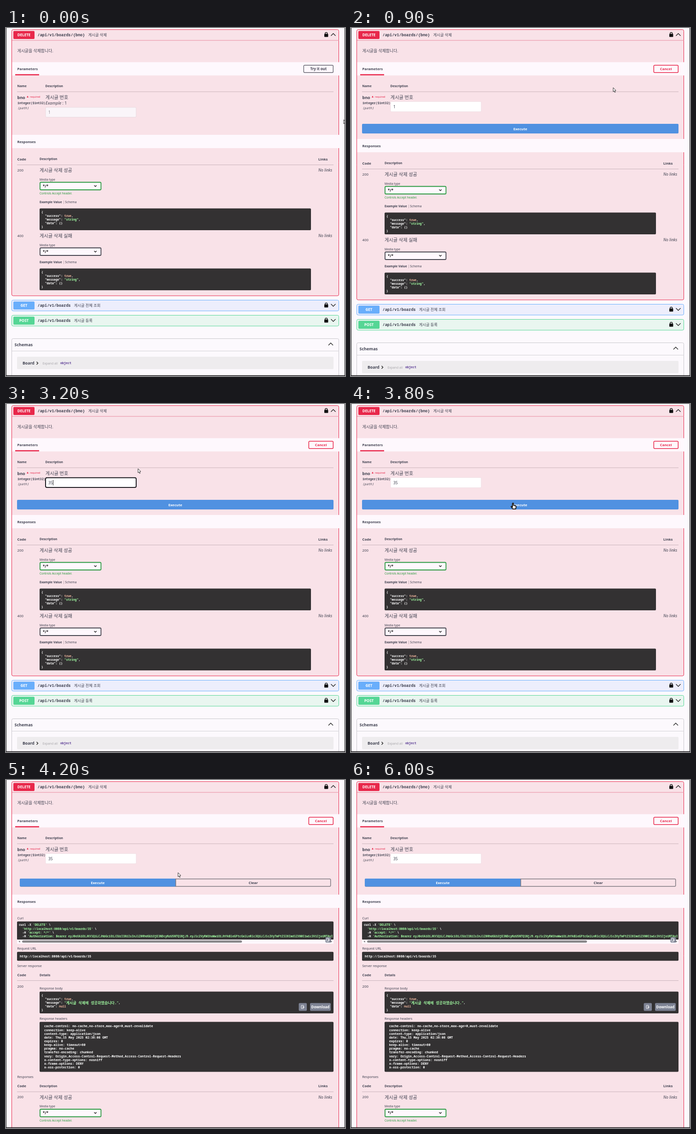
Recreate the animation shown at these times as an HTML page with a canvas. Size 737 px wide and 759 px high, loop 6100 ms.

```html
<!DOCTYPE html>
<html lang="ko">
<head>
<meta charset="utf-8">
<title>API docs</title>
<style>
  html, body { margin: 0; width: 100%; height: 100%; overflow: hidden; background: #fcf9fd; }
  canvas { display: block; }
</style>
</head>
<body>
<canvas id="stage" width="737" height="759"></canvas>
<script>
const ctx = document.getElementById('stage').getContext('2d');
const LOOP = 6100, STEP = 100;
const SANS = '"Noto Sans", "Noto Sans CJK KR", "Noto Sans CJK", sans-serif';
const MONO = '"Noto Sans Mono", "Noto Sans CJK KR", monospace';
const INK = '#3f4150', RED = '#e8274a', PINK = '#f9e2e8', PAGE = '#fcf9fd', STRIP = '#fef8fd';
const DARK = '#333132', WHITE = '#fff', GREEN = '#a2fca2', PEACH = '#f3b9a0', BLUE = '#5091e1';

// Moments of the interaction, in ms
const TRY = 800, FOCUS = 1500, ERASE = 2000, DIGIT_1 = 2100, DIGIT_2 = 2600, SEND = 3800, ANSWER = 3900;
const POINTER = [
  [0, 734, 200], [100, 734, 200], [600, 684, 90], [800, 674, 92], [900, 570, 130],
  [1300, 262, 168], [1500, 262, 169], [1800, 286, 141], [3200, 287, 141],
  [3700, 351, 216], [3900, 351, 216], [4200, 374, 202], [4900, 420, 330], [5500, 470, 770], [LOOP, 470, 770]
];

const clamp = v => Math.max(0, Math.min(1, v));

function text(s, x, y, size, { color = INK, style = '', align = 'left', family = SANS } = {}) {
  ctx.font = `${style} ${size}px ${family}`;
  ctx.fillStyle = color;
  ctx.textAlign = align;
  ctx.fillText(s, x, y + size * 0.36);
}
const bold = (s, x, y, size, more) => text(s, x, y, size, { style: 'bold', ...more });
const label = (s, x, y) => text(s, x, y, 7, { style: '500' });
const centered = (s, x, y, size, color) => bold(s, x, y, size, { color, align: 'center' });

// Monospace line made of [string, color, size] parts
function code(x, y, size, ...parts) {
  for (const [s, color = WHITE, own = size] of parts) {
    text(s, x, y, own, { color, style: 'bold', family: MONO });
    x += ctx.measureText(s).width;
  }
}

function box(x, y, w, h, fill, stroke, line = 1, radius = 2) {
  ctx.beginPath();
  ctx.roundRect(x, y, w, h, radius);
  if (fill) { ctx.fillStyle = fill; ctx.fill(); }
  if (stroke) { ctx.strokeStyle = stroke; ctx.lineWidth = line; ctx.stroke(); }
}
function rect(x, y, w, h, fill) {
  ctx.fillStyle = fill;
  ctx.fillRect(x, y, w, h);
}
function path(points, stroke, line = 1, fill) {
  ctx.beginPath();
  points.forEach(([x, y]) => ctx.lineTo(x, y));
  if (fill) { ctx.closePath(); ctx.fillStyle = fill; ctx.fill(); }
  if (stroke) { ctx.strokeStyle = stroke; ctx.lineWidth = line; ctx.stroke(); }
}
const rule = y => rect(24, y, 688, 1, '#c9b3bb');
const chevron = (x, y, w, h, line = 1.3) => path([[x - w, y - h], [x, y + h], [x + w, y - h]], '#222', line);

function operation(y, h, name, route, summary, color, fill, open) {
  box(12.5, y + 0.5, 711, h, fill, color, 1, 3);
  box(16, y + 3.5, 46, 17.5, color);
  centered(name, 39, y + 12.3, 8, WHITE);
  text(route, 68.5, y + 12.3, 8.6, { style: '600', family: MONO });
  text(summary, route.length * 5.16 + 75.5, y + 12.5, 8.3);
  box(692, y + 9.8, 8.4, 6.8, '#111', null, 0, 1);
  ctx.beginPath();
  ctx.arc(696.2, y + 9, 2.4, Math.PI, 0);
  ctx.lineTo(698.6, y + 11);
  ctx.moveTo(693.8, y + 9);
  ctx.lineTo(693.8, y + 11);
  ctx.strokeStyle = '#111';
  ctx.lineWidth = 1.4;
  ctx.stroke();
  chevron(711.5, y + 11.5, 5, open ? -2.5 : 2.5);
}

function strip(y, title) {
  rect(13, y, 711, 29, STRIP);
  bold(title, 24.5, y + 15, 7.65);
}

function jsonBody(x, y, w, value, data) {
  box(x, y, w, 47.5, DARK);
  const lines = [
    [['{']],
    [['  "success": '], ['true', PEACH], [',']],
    [['  "message": '], ...value, [',']],
    [['  "data": '], data],
    [['}']]
  ];
  lines.forEach((parts, i) => code(x + 4, y + 7.8 + i * 8.2, 6.4, ...parts));
}

function tableHead(y) {
  bold('Code', 24.5, y, 7.8);
  bold('Description', 73, y, 6.7);
  bold('Links', 679, y, 7.7);
  rule(y + 12);
}

function response(y, status, summary, accepts) {
  text(status, 24.5, y, 7.9);
  text(summary, 73, y + 0.5, 10.2);
  text('No links', 679, y, 8.5, { style: 'italic' });
  text('Media type', 73, y + 20.5, 6.5);
  box(74, y + 26.5, 132.5, 16.5, STRIP, accepts ? '#2b9a42' : '#45454f', 1.8);
  text('*/*', 80, y + 35, 8, { style: '600', color: '#222' });
  chevron(194.3, y + 34.5, 2.6, 1.3, 1.4);
  if (accepts) text('Controls Accept header.', 73, y + 51, 6.4, { color: '#2b9a42' });
  else y -= 12;
  bold('Example Value', 73, y + 70, 6.67);
  rect(125, y + 66, 0.8, 8, '#b5a5ad');
  text('Schema', 128.3, y + 70, 6.8);
  jsonBody(73, y + 83.5, 590, [['"string"', GREEN]], ['{}']);
}

function responses(y) {
  tableHead(y);
  response(y + 24, '200', '게시글 삭제 성공', true);
  response(y + 167, '400', '게시글 삭제 실패', false);
}

function schemas(y) {
  box(12.5, y + 0.5, 711, 120, PAGE, '#c9c7cc', 1, 3);
  text('Schemas', 18.5, y + 13.3, 9, { style: '600' });
  chevron(706, y + 12.5, 5, -2.5);
  rect(13, y + 27, 711, 1, '#d3d1d6');
  box(24, y + 40, 688, 27, '#eeecee');
  bold('Board', 36, y + 54, 8.7);
  path([[66.5, y + 51], [69.5, y + 54], [66.5, y + 57]], '#222', 1.4);
  text('Expand all', 79.5, y + 54.3, 6.8, { color: '#aaa8ad' });
  text('object', 118, y + 54, 6.7, { color: '#5a3a94', style: 'bold', family: MONO });
}

function parameters(t) {
  const editing = t >= TRY;
  text('게시글을 삭제합니다.', 24.5, 49.5, 8.9);
  strip(74.5, 'Parameters');
  rect(20, 100.7, 52, 2.6, RED);
  if (editing) {
    box(658.3, 81.3, 53, 16, STRIP, RED, 1.5);
    centered('Cancel', 684.7, 89.5, 7.8, RED);
  } else {
    box(647.3, 81.3, 64, 16, STRIP, '#666570', 1.4);
    centered('Try it out', 679.3, 89.5, 7.9, INK);
  }
  bold('Name', 24.5, 127, 6.75);
  bold('Description', 85.5, 127, 6.7);
  rule(138.5);
  bold('bno', 24.5, 151.5, 9);
  path([[45, 151.5], [47, 147.8], [49, 151.5]], null, 0, RED);
  text('required', 52, 149.5, 5.6, { color: RED });
  text('integer($int32)', 25, 163.5, 6.75, { style: '600', family: MONO });
  text('(path)', 25, 175, 6.8, { style: 'italic', family: MONO });
  text('게시글 번호', 85.8, 151.5, 10.2);
  if (!editing) {
    text('Example', 86, 163.5, 9.1, { style: 'italic' });
    text(': 1', 122.5, 163.5, 8.9);
    box(86, 173, 197, 21.5, '#faf5f9', '#ead9df');
    text('1', 92, 184, 8.5, { color: '#8b8990' });
    return;
  }
  const focused = t >= FOCUS && t < SEND;
  const value = t < ERASE ? '1' : t < DIGIT_1 ? '' : t < DIGIT_2 ? '3' : '35';
  if (focused) box(86, 160.8, 197, 21.2, WHITE, '#1d1b20', 2, 3);
  else box(86, 160.5, 197, 22, WHITE, '#f0e0e6');
  text(value, 92, 171.8, 8.5);
  if (focused) rect(92.2 + ctx.measureText(value).width, 165.5, 1, 12, '#222');
}

function copyIcon(x, y) {
  box(x - 3, y - 3.5, 5, 7, null, WHITE, 1, 1);
  path([[x + 4, y + 0.5], [x, y + 0.5], [x + 1.5, y - 1], [x, y + 0.5], [x + 1.5, y + 2]], WHITE, 0.9);
}

const TOKEN = 'eyJ0eXAiOiJKV1QiLCJhbGciOiJIUzI1NiIsInJlZ0RhdGUiOjE3NDcyNzU5NTQ1NjJ9.' +
  'eyJ1c2VyRW1haWwiOiJhYkBleGFtcGxlLnRlc3QiLCJ1c2VyTmFtZSI6Imd1ZXN0Iiwic3ViIjoiMTAyI';
const ADDRESS = 'http://localhost:8080/api/v1/boards/35';
const HEADERS = [
  'cache-control: no-cache,no-store,max-age=0,must-revalidate',
  'connection: keep-alive',
  'content-type: application/json',
  'date: Thu,15 May 2025 02:36:08 GMT',
  'expires: 0',
  'keep-alive: timeout=60',
  'pragma: no-cache',
  'transfer-encoding: chunked',
  'vary: Origin,Access-Control-Request-Method,Access-Control-Request-Headers',
  'x-content-type-options: nosniff',
  'x-frame-options: DENY',
  'x-xss-protection: 0'
];

function curlBox() {
  label('Curl', 24.5, 301);
  box(24, 308.5, 688, 40, DARK);
  ctx.save();
  ctx.beginPath();
  ctx.rect(24, 308, 688, 41);
  ctx.clip();
  [
    [['curl -X '], ["'DELETE'", GREEN], [' \\']],
    [[`  '${ADDRESS}'`, GREEN], [' \\']],
    [['  -H '], ["'accept: */*'", GREEN], [' \\']],
    [['  -H '], [`'Authorization: Bearer ${TOKEN}`, GREEN]]
  ].forEach((parts, i) => code(28, 316 + i * 8.2, 6.4, ...parts));
  ctx.restore();
  rect(24, 348, 688, 9, STRIP);
  box(35, 349.8, 478, 5, '#8a888b', null, 0, 2.5);
  path([[30.5, 350], [27.5, 352.3], [30.5, 354.6]], null, 0, '#777');
  path([[706, 350], [709, 352.3], [706, 354.6]], null, 0, '#777');
  box(694.5, 343, 12, 11.5, '#7d8293');
  copyIcon(700, 348.7);
}

function liveAnswer(t) {
  const p = clamp((t - ANSWER) / 300), ease = 1 - (1 - p) ** 2;
  const split = 110 + 259 * ease, height = 21 - 3.5 * ease, mid = 215 + height / 2;
  box(30.7, 215.7, 675, height - 1.2, null, '#807a82', 1.5);
  box(30, 215, split - 30, height, BLUE);
  rect(split - 0.7, 215, 1.5, height, '#807a82');
  centered('Execute', (30 + split) / 2, mid + 0.3, 7.7, WHITE);
  centered('Clear', (split + 706) / 2, mid + 0.3, 7.7, INK);

  ctx.save();
  ctx.translate(0, 3.5 * (1 - ease));
  strip(250, 'Responses');
  curlBox();
  label('Request URL', 24.5, 367.5);
  box(24, 374.8, 688, 19.4, DARK);
  code(30, 384.3, 6.82, [ADDRESS]);
  label('Server response', 24.5, 405.5);
  bold('Code', 24.5, 425.5, 7.8);
  bold('Details', 73, 425.5, 6.7);
  rule(437);
  text('200', 24.5, 449.7, 7.9);
  label('Response body', 73, 454.3);
  jsonBody(73, 461.5, 639,
    [['"', GREEN], ['게시글 삭제에 성공하였습니다.', GREEN, 8], ['"', GREEN]], ['null', PEACH]);
  box(636.5, 486.5, 17.5, 17, '#7d8293');
  copyIcon(645, 495);
  box(661, 486.5, 45, 17, '#7d8293');
  centered('Download', 683.5, 495.3, 7.95, WHITE);
  label('Response headers', 73, 520.3);
  box(73, 527.5, 639, 109, DARK);
  HEADERS.forEach((line, i) => code(83, 537 + i * 8.14, 6.8, [line]));
  label('Responses', 24.5, 647.7);
  responses(667.5);
  ctx.restore();
}

function pointer(t) {
  const i = POINTER.findIndex(k => k[0] > t);
  const [t0, x0, y0] = POINTER[i - 1], [t1, x1, y1] = POINTER[i];
  const p = (t - t0) / (t1 - t0), x = x0 + (x1 - x0) * p, y = y0 + (y1 - y0) * p;
  const inside = (l, top, r, b) => x > l && x < r && y > top && y < b;
  ctx.save();
  ctx.translate(x, y);
  ctx.lineJoin = 'round';
  if (inside(647, 81, 712, 98) || inside(24, 209, 712, 232)) {
    path([[0, 1], [1.2, 0], [2.4, 1], [2.4, 5], [7, 6], [8, 8], [7, 13], [0.8, 13], [-3, 8], [-2, 7], [0, 9]], '#222', 2, WHITE);
    path([[0, 9], [0, 1], [1.2, 0]], '#222', 1);
  } else if (t >= TRY && inside(86, 160, 283, 183)) {
    path([[-2, -5], [2, -5]], '#222');
    path([[0, -5], [0, 5]], '#222');
    path([[-2, 5], [2, 5]], '#222');
  } else {
    path([[0, 0], [0, 9], [2, 7.3], [3.4, 10.5], [4.8, 9.9], [3.5, 6.8], [6, 6.3], [0, 0]], '#333', 1, WHITE);
  }
  ctx.restore();
}

function draw(t) {
  const answered = t >= ANSWER, shift = t >= TRY ? 9 : 0;
  rect(0, 0, 737, 759, PAGE);
  operation(3, answered ? 800 : 580.5 + shift, 'DELETE', '/api/v1/boards/{bno}', '게시글 삭제', RED, PINK, true);
  rect(13, 26.5, 711, 1, '#e88ba0');
  parameters(t);
  if (answered) {
    liveAnswer(t);
  } else {
    if (shift) {
      box(24, 209, 688, 21, BLUE);
      centered('Execute', 368, 219.8, 7.7, WHITE);
    }
    ctx.save();
    ctx.translate(0, shift);
    strip(233, 'Responses');
    responses(286);
    operation(593, 23.5, 'GET', '/api/v1/boards', '게시글 전체 조회', '#69aefb', '#edeefc');
    operation(626, 23.5, 'POST', '/api/v1/boards', '게시글 등록', '#55d695', '#e9f6f0');
    schemas(677);
    ctx.restore();
  }
  pointer(t);
  rect(0, 0, 1, 759, '#2a282b');
  rect(736, 0, 1, 759, '#2a282b');
  rect(0, 757.5, 737, 1.5, '#1c1a1d');
}

function frame() {
  const t = performance.now() % LOOP;
  draw(Math.floor(t / STEP) * STEP);
  requestAnimationFrame(frame);
}
frame();
</script>
</body>
</html>
```
